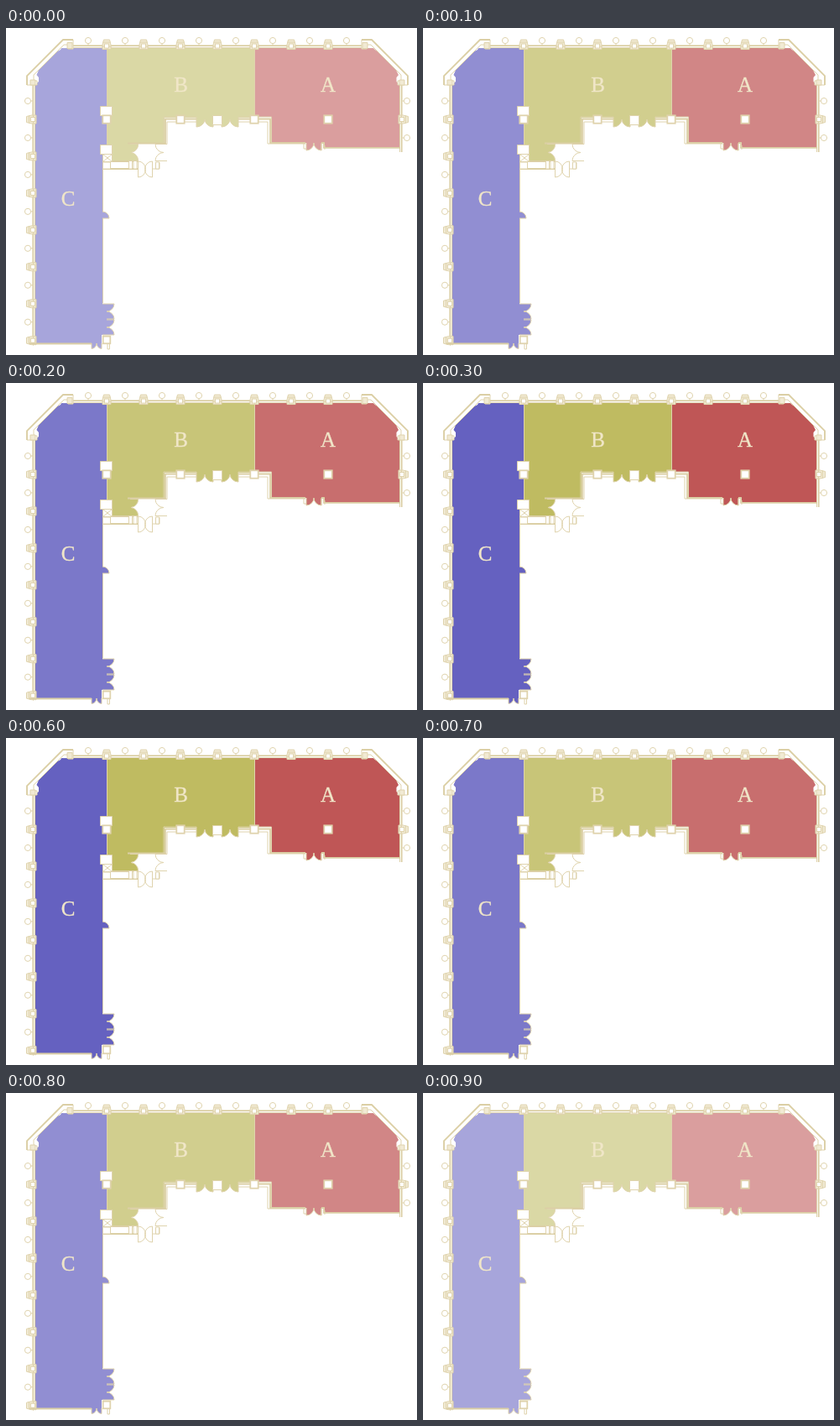
An HTML page that plays this animation: 490x390 px, repeating every 1 s.

```html
<!DOCTYPE html>
<html lang="en">
<head>
<meta charset="utf-8">
<title>Floor plan</title>
<style>
  html, body { margin: 0; width: 100%; height: 100%; overflow: hidden; background: #fff; }
  svg { display: block; width: 490px; height: 390px; }
  .rooms { animation: pulse 1s step-end infinite; }
  @keyframes pulse {
    0%, 90%, 100% { opacity: .5; }
    10%, 80% { opacity: .625; }
    20%, 70% { opacity: .75; }
    30%, 60% { opacity: .875; }
    40% { opacity: 1; }
  }
  .line { fill: none; stroke: #dfd3ad; stroke-width: 1; }
  .wall { fill: none; stroke: #dbcfa5; stroke-width: 1.8; }
  .box { fill: #fff; stroke: #dfd3ad; stroke-width: 1; }
  .post { fill: #fff; stroke: #dfd3ad; stroke-width: 1.8; }
  .pier { fill: #f1ead4; stroke: #dfd3ad; stroke-width: 1; }
  text {
    font: 25px "Liberation Serif", "Times New Roman", serif;
    fill: #f0e6c8; stroke: #f0e6c8; stroke-width: .35; text-anchor: middle;
  }
</style>
</head>
<body>
<svg viewBox="0 0 490 390">
  <defs>
    <g id="pier">
      <path class="pier" d="M-3.500-6.500h7l1.500 6v5.500h-10v-5.500z"/>
      <path class="line" d="M-4.500-3.500h9M-6 1.500h12"/>
      <rect class="box" x="-2.500" y="-1.500" width="5" height="5"/>
    </g>
    <g id="lamp">
      <circle class="box" r="3.600"/>
      <path class="line" d="M0 3.600v3"/>
    </g>
    <g id="corner">
      <path class="box" d="M80 14H68L25 57v11h12v-5h-4v-7L69 20h5v5h6z"/>
      <path class="wall" d="M80 14H68L25 57v11"/>
      <path class="pier" d="M73 17.500h6v7h-6zM29 62h6v6h-6z"/>
    </g>
  </defs>

  <g class="rooms">
    <path fill="#504bb7" d="M66 24H120V158H115V219A8 8 0 0 1 123 227H115V329H129A9 9 0 0 1 120 338A9 9 0 0 1 129 347V348A9 9 0 0 1 120 357A9 9 0 0 1 129 366H114V382.500A6.500 6.500 0 0 1 108 376A6.500 6.500 0 0 1 102 382.500V376H34.500V67L39 64V59L36.500 56L39 50L61 28L65 26z"/>
    <path fill="#b6b24b" d="M120 24H296V107H277V118A10 10 0 0 1 267 109A10 10 0 0 1 257 118V107H247V118A10 10 0 0 1 237 109A10 10 0 0 1 227 118V107H189V138H157.500A9.500 9.500 0 0 1 149 148.500A9.500 9.500 0 0 1 157.500 158.500H120z"/>
    <path fill="#b63e3e" d="M296 24H438L440 26L443 28L465 50L468 56L465.500 59V64L469.500 67V143H380V137H376V146A9 9 0 0 1 367 137A9 9 0 0 1 358 146V137H316V106H296z"/>
  </g>

  <g id="facade">
    <path class="wall" d="M80 21.200H424M32.300 68V376M471.700 68V148"/>
    <path class="line" d="M80 23.500H424M34.500 68V376M469.500 68V148"/>
    <use href="#corner"/>
    <use href="#corner" transform="matrix(-1 0 0 1 504 0)"/>
  </g>

  <!-- inner walls -->
  <path class="wall" d="M227 108.500H190V137.500H145M277 108.500H315V137H357M376 137H379V142.800H470M28 376.500H102M115 159H157M115 168H157"/>
  <path class="line" d="M120.500 24V93M120.500 115V139M296.500 24V104M227 106H188V137M227 112H192V138.500M277 106H316.500V137M277 112H312V138H357M355 136v8h3M376 146v-8M380 145v-5M115.500 168V219M115.500 227V328M175 168H183V160"/>
  <path class="box" d="M115.500 150.500h11v9h-11zM115.500 160h9v8h-9zM146.500 158.500h4v9.500h-4zM152 158.500h4v9.500h-4zM178.500 160h4v8h-4z"/>
  <path class="line" d="M115.500 150.500l11 9M126.500 150.500l-11 9"/>

  <!-- doors -->
  <path class="line" d="M227 106V118A10 10 0 0 0 237 109A10 10 0 0 0 247 118V106M257 106V118A10 10 0 0 0 267 109A10 10 0 0 0 277 118V106M358 137V146A9 9 0 0 0 367 137A9 9 0 0 0 376 146V137
    M148 138.500H157.500A9.500 9.500 0 0 1 149 148.500A9.500 9.500 0 0 1 157.500 158.500H148
    M192 138.500H178A10 10 0 0 0 188 148.500A10 10 0 0 0 178 158.500H192
    M157.500 158.500V178A9 9.500 0 0 0 157.500 159M174.500 159V178A9 9.500 0 0 1 174.500 159
    M115 219A8 8 0 0 1 123 227H115
    M115 329H129A9 9 0 0 1 120 338A9 9 0 0 1 129 347H120M120 348H129A9 9 0 0 1 120 357A9 9 0 0 1 129 366H115
    M102 376V382.500A6.500 6.500 0 0 0 108 376A6.500 6.500 0 0 0 114 382.500V376M121 377V383H123.500V377"/>

  <!-- columns -->
  <path class="box" d="M112.500 93.500h14v11h-14zM112.500 139.500h14v11h-14zM246.500 104.500h11v11h-11z"/>
  <g id="columns"></g>

  <text x="208.500" y="75.500">B</text>
  <text x="384" y="75.500">A</text>
  <text x="74" y="212">C</text>
</svg>
<script>
  const ns = "http://www.w3.org/2000/svg";
  const facade = document.getElementById("facade");
  const columns = document.getElementById("columns");
  const pitch = 43.95;

  function add(parent, tag, attrs) {
    const el = document.createElementNS(ns, tag);
    for (const key in attrs) el.setAttribute(key, attrs[key]);
    parent.append(el);
  }

  function place(id, x, y, turn) {
    add(facade, "use", { href: "#" + id, transform: `translate(${x} ${y}) rotate(${turn})` });
  }

  function addPost(x, y, size) {
    add(columns, "rect", { class: "post", x: x - size / 2, y: y - size / 2, width: size, height: size });
  }

  for (let i = 0; i < 8; i++) {
    place("lamp", 98 + i * 44, 15, 0);
    if (i < 7) {
      place("pier", 120 + i * 44, 20.5, 0);
      place("lamp", 26, 87 + i * pitch, -90);
      place("pier", 31, 109 + i * pitch, -90);
    }
  }
  place("lamp", 478, 87, 90);
  place("lamp", 478, 131, 90);
  place("pier", 473, 109, 90);

  for (const x of [120, 208, 296, 384]) addPost(x, 109, 9.4);
  addPost(120, 372, 8.6);
</script>
</body>
</html>
```
